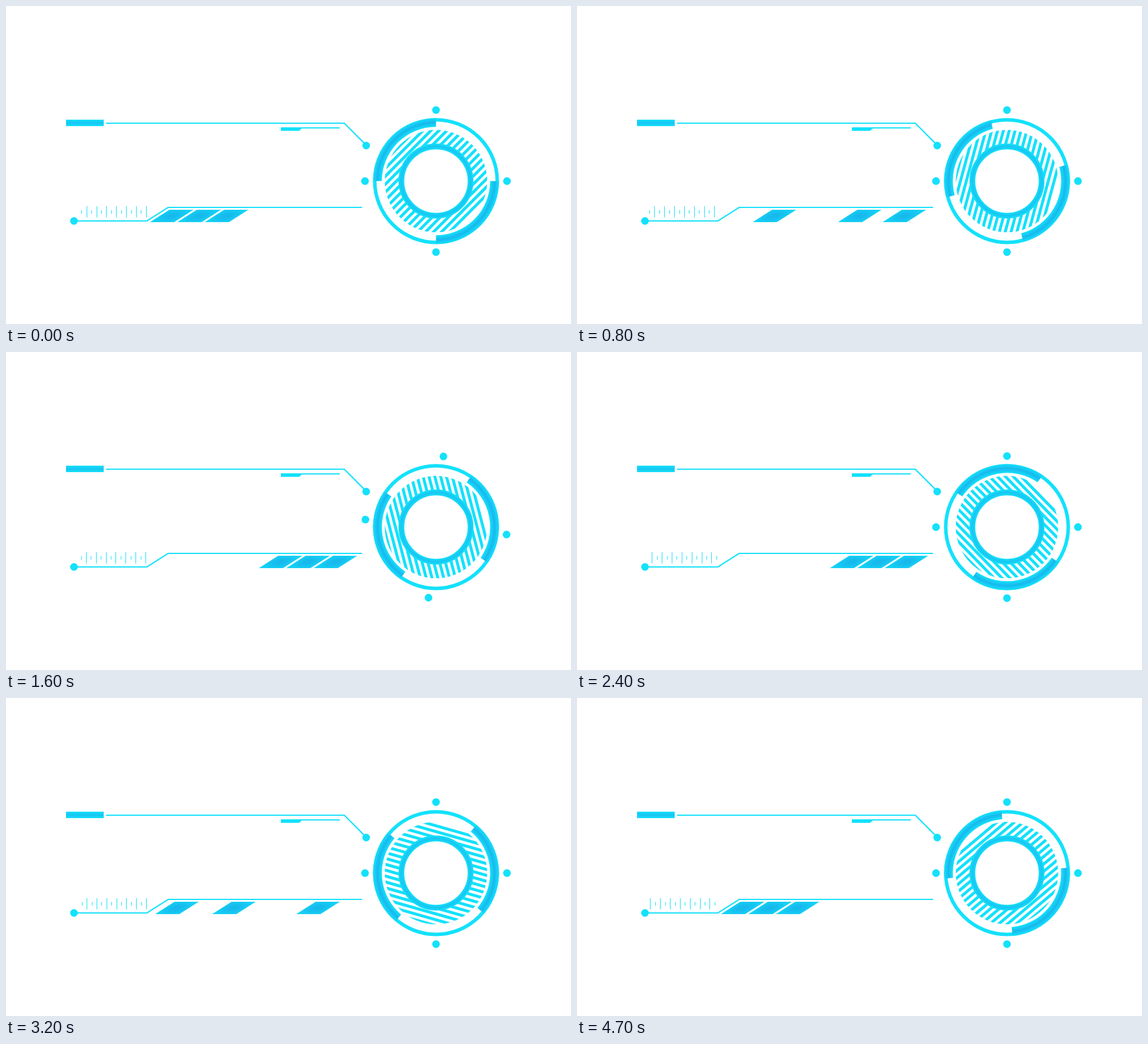
An HTML page with a canvas for the animation above (4.73 s loop, 960x540 px).

```html
<!DOCTYPE html>
<html lang="en">
<head>
<meta charset="utf-8">
<title>HUD callout</title>
<style>
html, body { margin: 0; width: 100%; height: 100%; overflow: hidden; background: #fff; }
canvas { display: block; }
</style>
</head>
<body>
<canvas id="stage" width="960" height="540"></canvas>
<script>
const ctx = document.getElementById('stage').getContext('2d');
const LOOP = 4730;
const CYAN = '#14e1fb', EDGE = '#14d6f7', DEEP = '#18b8ed';
const CX = 730.6, CY = 297.3, TAU = Math.PI * 2;
const rad = deg => deg * Math.PI / 180;

// Strong ease in and out, from 0 to 1
function ease(t, start, length) {
  const p = Math.min(1, Math.max(0, (t - start) / length));
  return p < 0.5 ? 16 * p ** 5 : 1 - 16 * (1 - p) ** 5;
}

function dot(x, y, r = 6.5) {
  ctx.fillStyle = CYAN;
  ctx.beginPath();
  ctx.arc(x, y, r, 0, TAU);
  ctx.fill();
}

function path(points, close) {
  ctx.beginPath();
  points.forEach(([x, y]) => ctx.lineTo(x, y));
  if (close) ctx.closePath();
}

function line(points, width = 2) {
  ctx.strokeStyle = CYAN;
  ctx.lineWidth = width;
  path(points);
  ctx.stroke();
}

function ring(r, width, color, from = 0, to = TAU) {
  ctx.strokeStyle = color;
  ctx.lineWidth = width;
  ctx.beginPath();
  ctx.arc(0, 0, r, from, to);
  ctx.stroke();
}

// Radial shading across a band: bright edges, deeper middle
function bandShade(inner, outer, middle) {
  const g = ctx.createRadialGradient(0, 0, inner, 0, 0, outer);
  g.addColorStop(0, CYAN);
  g.addColorStop(0.5, middle);
  g.addColorStop(1, CYAN);
  return g;
}

function frameLines() {
  const g = ctx.createLinearGradient(0, 193, 0, 204);
  g.addColorStop(0, CYAN);
  g.addColorStop(0.5, '#17c6f2');
  g.addColorStop(1, CYAN);
  ctx.fillStyle = g;
  ctx.fillRect(102, 193, 64, 11);

  line([[170, 199], [574.8, 199], [612, 236.4]], 2.2);
  dot(612, 237);
  ctx.fillStyle = CYAN;
  path([[467, 206], [505, 206], [498, 212], [467, 212]], true);
  ctx.fill();
  line([[500, 207], [567, 207]]);

  line([[115.5, 365], [239.5, 365], [275.5, 342], [605, 342]], 2.2);
  dot(115.5, 365);
}

const TICK_GAP = 16.85;
const TICK_KEYS = [[0, 0], [800, 5.3], [1600, 17.7], [2400, 26.3],
                   [3200, 33.4], [3930, 36.7], [4700, 46.1], [4730, 46.5]];

function tickShift(t) {
  const i = Math.max(1, TICK_KEYS.findIndex(k => k[0] >= t));
  const [t0, a] = TICK_KEYS[i - 1], [t1, b] = TICK_KEYS[i];
  return a + (b - a) * (t - t0) / (t1 - t0);
}

function ticks(t) {
  ctx.fillStyle = CYAN;
  const origin = 137.3 - tickShift(t);
  for (let n = -2; n < 20; n++) {
    const x = origin + n * TICK_GAP / 2;
    if (x < 123.5 || x > 239.5) continue;
    const half = n % 2 ? 3 : 9.5;
    ctx.fillRect(Math.round(x - 0.5), 349.5 - half, 1, half * 2);
  }
}

const slab = (x, inset) => [
  [x + 2.6 * inset, 367 - inset], [x + 33 + 0.6 * inset, 346 + inset],
  [x + 74 - 2.6 * inset, 346 + inset], [x + 41 - 0.6 * inset, 367 - inset]];

function bars(t) {
  for (let i = 0; i < 3; i++) {
    const out = ease(t, (2 - i) * 157, 1085);
    const back = ease(t, 2455 + i * 157, 1085);
    const x = 244.6 + i * 46.6 + 185 * (out - back);
    ctx.save();
    path(slab(x, 0), true);
    ctx.clip();
    ctx.fillStyle = EDGE;
    ctx.fillRect(x, 346, 75, 21);
    ctx.filter = 'blur(4px)';
    ctx.fillStyle = '#18b4ea';
    path(slab(x, 3), true);
    ctx.fill();
    ctx.restore();
  }
}

const HATCH_GAP = 9.6;

function hatch(t) {
  ctx.save();
  ctx.beginPath();
  ctx.arc(0, 0, 87, 0, TAU);
  ctx.arc(0, 0, 60, 0, TAU, true);
  ctx.clip();
  ctx.rotate(-rad(45 + 0.03723 * t));
  ctx.fillStyle = CYAN;
  for (let n = -9; n <= 8; n++) ctx.fillRect(-90, HATCH_GAP * n + 0.5 - 2.5, 180, 5);
  ctx.restore();
}

function dial(t) {
  ctx.save();
  ctx.translate(CX, CY);
  hatch(t);
  ring(58.8, 9.8, bandShade(53.9, 63.7, '#18c4f1'));
  ring(104.1, 6, CYAN);

  const turn = 304.5 * ease(t, 0, 1575) + 185.5 * ease(t, 1612, 1588) + 225 * ease(t, 3202, 1390);
  const shade = bandShade(92, 107, DEEP);
  for (const start of [0, 180]) {
    ring(99.5, 15, shade, rad(start + turn), rad(start + turn + 90));
  }

  ctx.rotate(rad(180 * (ease(t, 866, 1450) + ease(t, 3201, 1450))));
  for (let i = 0; i < 4; i++) {
    dot(120.6, 0);
    ctx.rotate(Math.PI / 2);
  }
  ctx.restore();
}

function draw(t) {
  ctx.fillStyle = '#fff';
  ctx.fillRect(0, 0, 960, 540);
  frameLines();
  ticks(t);
  bars(t);
  dial(t);
}

const began = performance.now();
function tick() {
  draw((performance.now() - began) % LOOP);
  requestAnimationFrame(tick);
}
tick();
</script>
</body>
</html>
```
